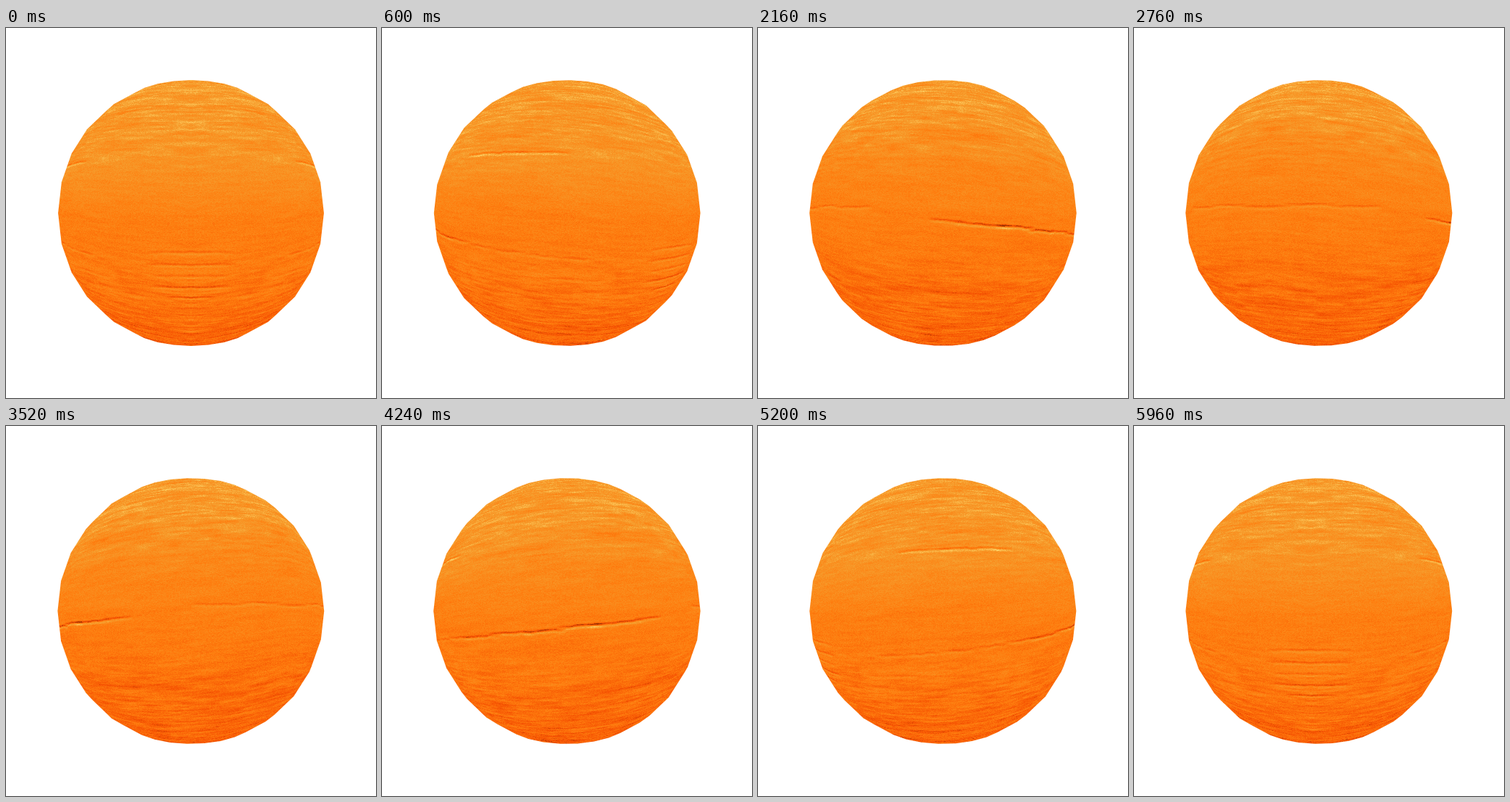
An HTML page with a canvas that plays this animation: 512 by 512 pixels, repeating every 6 s.

```html
<!DOCTYPE html>
<html lang="en">
<head>
<meta charset="utf-8">
<title>Turning orange sphere</title>
<style>
  html, body { margin: 0; width: 100%; height: 100%; overflow: hidden; background: #fff; }
  canvas { display: block; width: 100vmin; height: 100vmin; }
</style>
</head>
<body>
<canvas id="stage" width="512" height="512"></canvas>
<script>
const SIZE = 512, MID = SIZE / 2, LOOP = 6000, STEP = 40;
const DIST = 2.064;                                   // camera distance in sphere radii
const FOCAL = MID / Math.tan(37.5 * Math.PI / 180);
const RAD = Math.PI / 180, SEGMENT = 11.25;
const COLS = 720, ROWS = 900, LAT_MAX = 66;           // texture covers half a turn and is mirrored

const clamp = (x, lo, hi) => Math.min(hi, Math.max(lo, x));
const smooth = x => { x = clamp(x, 0, 1); return x * x * (3 - 2 * x); };
const bell = (x, width) => Math.exp(-(x * x) / (width * width));

function hash(x, y, seed) {
  let h = Math.imul(x, 374761393) + Math.imul(y, 668265263) + Math.imul(seed, 974634777);
  h = Math.imul(h ^ (h >>> 13), 1274126177);
  h = Math.imul(h ^ (h >>> 15), 2246822519);
  return ((h ^ (h >>> 16)) >>> 0) / 4294967296;
}

// Value noise in -1..1
function noise(x, y, seed) {
  const ix = Math.floor(x), iy = Math.floor(y);
  const fx = smooth(x - ix), fy = smooth(y - iy);
  const top = hash(ix, iy, seed) * (1 - fx) + hash(ix + 1, iy, seed) * fx;
  const low = hash(ix, iy + 1, seed) * (1 - fx) + hash(ix + 1, iy + 1, seed) * fx;
  return 2 * (top * (1 - fy) + low * fy) - 1;
}

// A fracture is a row of short, slightly scattered grooves along a line
const grooves = [];
function fracture(from, to, latAt, count, depthAt) {
  for (let i = 0; i < count; i++) {
    const lon = from + (to - from) * (i + .5) / count;
    const half = (to - from) / count * (.45 + .4 * hash(i, count, 7));
    const lat = latAt(lon) + .7 * (hash(i, count, 8) - .5);
    grooves.push({ lon, half, lat, slope: (latAt(lon + 1) - latAt(lon)) * .8, depth: depthAt(lon) });
  }
}
fracture(28, 133, lon => -15.5 + .108 * lon, 11, lon => .35 + .65 * bell(lon - 105, 28));
fracture(38, 68, lon => 14.6 + .05 * lon, 3, () => .65);
fracture(150, 210, () => 2, 5, () => .45);
for (let i = 0; i < 5; i++) {
  grooves.push({ lon: 0, half: 7 + 6 * hash(i, 0, 9), lat: -10 - 3.4 * i, slope: 0, depth: .5 });
}

function grooveTone(lon, lat) {
  let tone = 0;
  for (const groove of grooves) {
    const along = (lon - groove.lon) / groove.half;
    if (Math.abs(along) >= 1) continue;
    const off = lat - groove.lat - groove.slope * (lon - groove.lon) - .15 * noise(lon / 2, groove.lat, 5);
    if (Math.abs(off) > 2.5) continue;
    const taper = Math.sqrt(1 - along * along);
    tone += groove.depth * taper * (.28 * bell(off + .7, .35) - .38 * bell(off, .28));
  }
  return tone;
}

function toneAt(lon, lat, col, row) {
  const up = Math.sin(lat * RAD), turn = Math.cos(lon * RAD);
  let tone = .53 + (up > 0 ? .23 * Math.tanh(up * 2.1) : .24 * up);
  tone += .05 * turn * bell(lat - 15, 12) + .035 * turn * bell(lat + 22, 10);
  const v = lat - .075 * lon;
  const streak = .6 * noise(lon / 9, v / .75, 1) + .5 * noise(lon / 3, v / .4, 2)
               + .3 * noise(lon / 25, v / 2, 3);
  const amp = .05 + .11 * smooth((Math.abs(lat) - 4) / 24);
  return tone + amp * streak + .14 * (hash(col, row, 4) - .5) + grooveTone(lon, lat);
}

const ramp = [[135, 42, 0], [246, 82, 2], [254, 124, 14], [246, 156, 44], [255, 212, 104]];
function colour(tone) {
  const pos = clamp(tone, 0, .9999) * (ramp.length - 1), i = Math.floor(pos);
  const [r, g, b] = ramp[i].map((c, n) => Math.round(c + (ramp[i + 1][n] - c) * (pos - i)));
  return (255 << 24 | b << 16 | g << 8 | r) >>> 0;
}
const palette = Uint32Array.from({ length: 256 }, (_, i) => colour(i / 255));

const texture = new Uint32Array(COLS * ROWS);
for (let row = 0; row < ROWS; row++) {
  const lat = LAT_MAX * (1 - 2 * row / ROWS);
  for (let col = 0; col < COLS; col++) {
    const tone = toneAt(col * 180 / COLS, lat, col, row);
    texture[row * COLS + col] = palette[Math.round(clamp(tone, 0, 1) * 255)];
  }
}

// Every stage pixel that looks at the sphere, with its place on it
const pixels = [];
for (let y = 0; y < SIZE; y++) {
  for (let x = 0; x < SIZE; x++) {
    const dx = x + .5 - MID, dy = y + .5 - MID;
    const a = dx * dx + dy * dy + FOCAL * FOCAL, b = DIST * FOCAL;
    const disc = b * b - a * (DIST * DIST - 1);
    if (disc < -2500) continue;
    const s = (b - Math.sqrt(Math.max(0, disc))) / a;
    const lat = Math.asin(clamp(-dy * s, -1, 1)) / RAD;
    const row = clamp(Math.floor((1 - lat / LAT_MAX) / 2 * ROWS), 0, ROWS - 1);
    const lon = Math.atan2(dx * s, DIST - FOCAL * s) / RAD;
    pixels.push({ at: y * SIZE + x, start: row * COLS, lon });
  }
}

const ctx = document.getElementById('stage').getContext('2d');
const layer = document.createElement('canvas');
layer.width = layer.height = SIZE;
const layerCtx = layer.getContext('2d');
const image = layerCtx.createImageData(SIZE, SIZE);
const out = new Uint32Array(image.data.buffer);

function meshPoints(turn) {
  const points = [];
  for (let lat = SEGMENT - 90; lat < 90; lat += SEGMENT) {
    const ring = Math.cos(lat * RAD), height = Math.sin(lat * RAD);
    for (let lon = 0; lon < 360; lon += SEGMENT) {
      const angle = (lon + turn) * RAD;
      const scale = FOCAL / (DIST - ring * Math.cos(angle));
      points.push([MID + ring * Math.sin(angle) * scale, MID - height * scale]);
    }
  }
  return points;
}

function halfHull(points) {
  const hull = [];
  for (const p of points) {
    while (hull.length > 1) {
      const [a, b] = hull.slice(-2);
      if ((b[0] - a[0]) * (p[1] - a[1]) - (b[1] - a[1]) * (p[0] - a[0]) > 0) break;
      hull.pop();
    }
    hull.push(p);
  }
  return hull;
}

function outline(turn) {
  const points = meshPoints(turn).sort((a, b) => a[0] - b[0] || a[1] - b[1]);
  const path = new Path2D();
  for (const [x, y] of [...halfHull(points), ...halfHull(points.reverse())]) path.lineTo(x, y);
  path.closePath();
  return path;
}

function draw(time) {
  const turn = time / LOOP * 360;
  for (const { at, start, lon } of pixels) {
    let angle = (lon - turn + 720) % 360;
    if (angle > 180) angle = 360 - angle;
    out[at] = texture[start + Math.min(COLS - 1, Math.floor(angle * COLS / 180))];
  }
  layerCtx.putImageData(image, 0, 0);
  ctx.fillStyle = '#fff';
  ctx.fillRect(0, 0, SIZE, SIZE);
  ctx.save();
  ctx.clip(outline(turn));
  ctx.drawImage(layer, 0, 0);
  ctx.restore();
}

const begin = performance.now();
let shown = -1;
function tick() {
  const time = Math.floor((performance.now() - begin) % LOOP / STEP) * STEP;
  if (time !== shown) draw(shown = time);
  requestAnimationFrame(tick);
}
tick();
</script>
</body>
</html>
```
